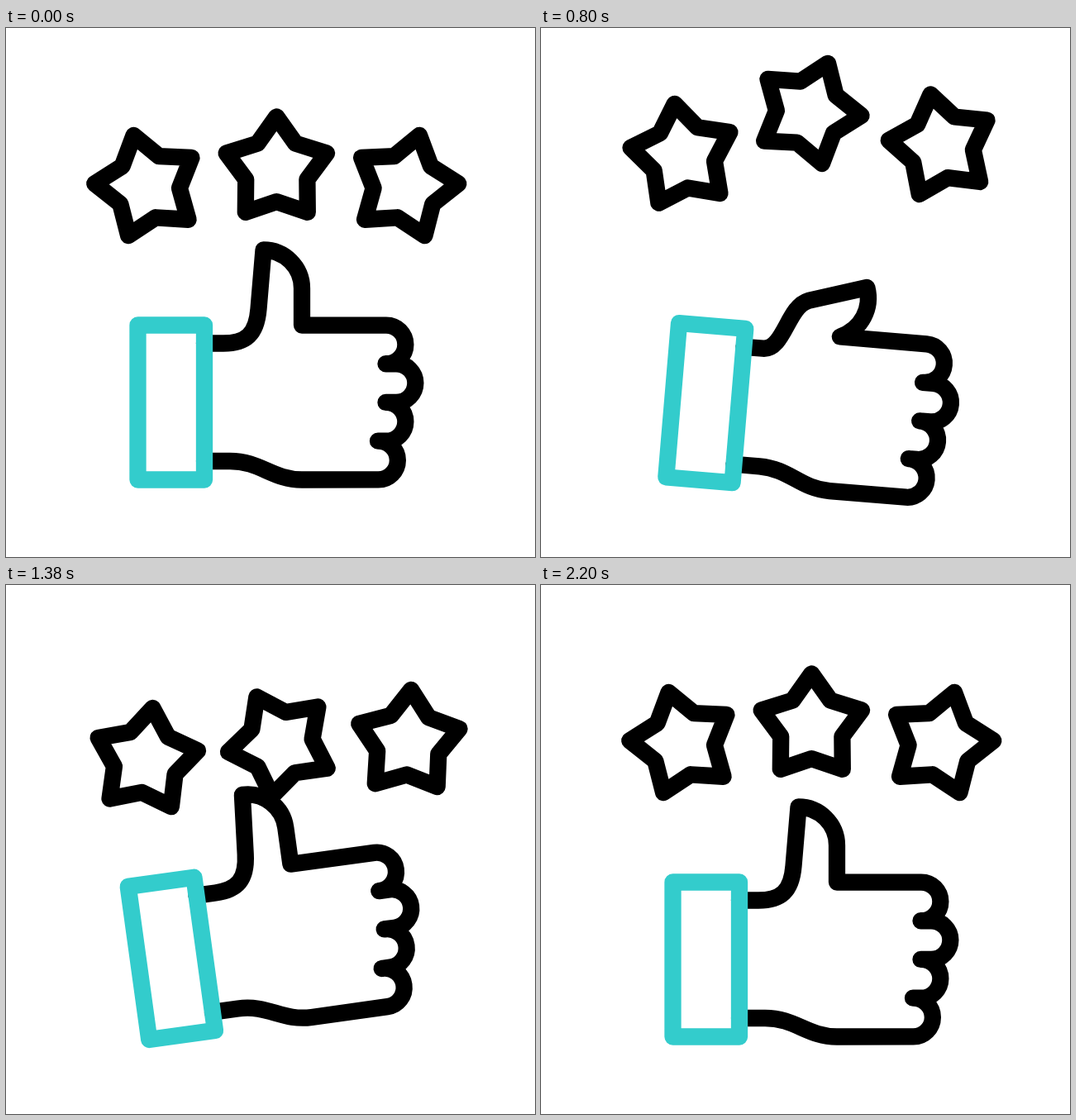
An HTML page with a canvas for the animation above (2.22 s loop, 640x640 px).

```html
<!DOCTYPE html>
<html>
<head>
<meta charset="utf-8">
<title>Thumbs up with stars</title>
<style>
  html, body { margin: 0; width: 100%; height: 100%; overflow: hidden; background: #fff; }
  canvas { display: block; width: 640px; height: 640px; }
</style>
</head>
<body>
<canvas id="stage" width="640" height="640"></canvas>
<script>
const ctx = document.getElementById('stage').getContext('2d');
const LOOP = 2220, STEP = 20, PHASE = 600, STAGGER = 200;
const BLACK = '#000', TEAL = '#33cccc', LINE = 20.3;

const rad = deg => deg * Math.PI / 180;

function ease(t, start, end) {
  const u = Math.min(1, Math.max(0, (t - start) / (end - start)));
  return u * u * (3 - 2 * u);
}

// Rest, first extreme, second extreme, rest again: one phase per leg.
function swing(t, first, second) {
  return first * ease(t, 0, PHASE)
    + (second - first) * ease(t, PHASE, 2 * PHASE)
    - second * ease(t, 2 * PHASE, 3 * PHASE);
}

function stroke(color) {
  ctx.strokeStyle = color;
  ctx.lineWidth = LINE;
  ctx.stroke();
}

// Each star spins once around an axis slightly off its centre.
function drawStar(side, axisX, axisY, time) {
  const t = time - (side + 1) * STAGGER;
  const x = 327.3 + side * 156.3;
  const y = side ? 191.6 : 171.2;

  ctx.save();
  ctx.translate(axisX, axisY + swing(t, -64, 25.6));
  ctx.rotate(rad(360 * ease(t, 0, 3 * PHASE)));
  ctx.translate(x - axisX, y - axisY);
  ctx.rotate(rad(15 * side));
  ctx.beginPath();
  for (let i = 0; i < 10; i++) {
    const r = i % 2 ? 39 : 63.8;
    const a = rad(i * 36 - 90);
    ctx.lineTo(r * Math.cos(a), r * Math.sin(a));
  }
  ctx.closePath();
  stroke(BLACK);
  ctx.restore();
}

function addThumb(bend) {
  const mix = (up, bent) => up.map((v, i) => v + (bent[i] - v) * bend);
  const line = p => ctx.lineTo(...p);
  const curve = (a, b, end) => ctx.bezierCurveTo(...a, ...b, ...end);
  const corner = mix([358, 359.5], [355, 359.5]);

  ctx.lineTo(263, 381.5);
  curve(mix([290, 381.5], [288.6, 381.5]),
        mix([303, 371], [288.6, 328.5]),
        mix([305.5, 340], [313.1, 319.3]));
  line(mix([311.5, 268.5], [382.4, 297.5]));
  curve(mix([337, 268.5], [390.6, 321.6]),
        mix([358, 289.5], [380.6, 348]),
        mix([358, 315], corner));
  line(corner);
}

function addFingers() {
  const centers = [460, 472, 460, 450.5];
  centers.forEach((x, i) => {
    const y = 382.9 + 46.7 * i;
    ctx.arc(x, y, 23.35, -Math.PI / 2, Math.PI / 2);
    if (i < 3) ctx.lineTo(Math.min(x, centers[i + 1]) - 0.5, y + 23.35);
  });
}

function drawHand(time) {
  ctx.save();
  ctx.translate(192, 448);
  ctx.rotate(rad(swing(time, 10, -10)));
  ctx.translate(-192, -448);

  ctx.beginPath();
  ctx.moveTo(240, 381.5);
  addThumb(ease(time, 0, 240) - ease(time, 960, 1200));
  addFingers();
  ctx.lineTo(358, 546.5);
  ctx.bezierCurveTo(322, 546.5, 308, 524, 271, 524);
  ctx.lineTo(240, 524);
  stroke(BLACK);

  ctx.beginPath();
  ctx.rect(159.5, 359.5, 80.5, 187);
  stroke(TEAL);
  ctx.restore();
}

function render(time) {
  ctx.fillStyle = '#fff';
  ctx.fillRect(0, 0, 640, 640);
  ctx.lineJoin = ctx.lineCap = 'round';
  drawStar(-1, 170.7, 193.7, time);
  drawStar(0, 327.9, 167.1, time);
  drawStar(1, 485.3, 191.6, time);
  drawHand(time);
}

let origin = null;
function tick(now) {
  if (origin === null) origin = now;
  const time = (now - origin) % LOOP;
  render(Math.floor(time / STEP + 0.001) * STEP);
  requestAnimationFrame(tick);
}
render(0);
requestAnimationFrame(tick);
</script>
</body>
</html>
```
